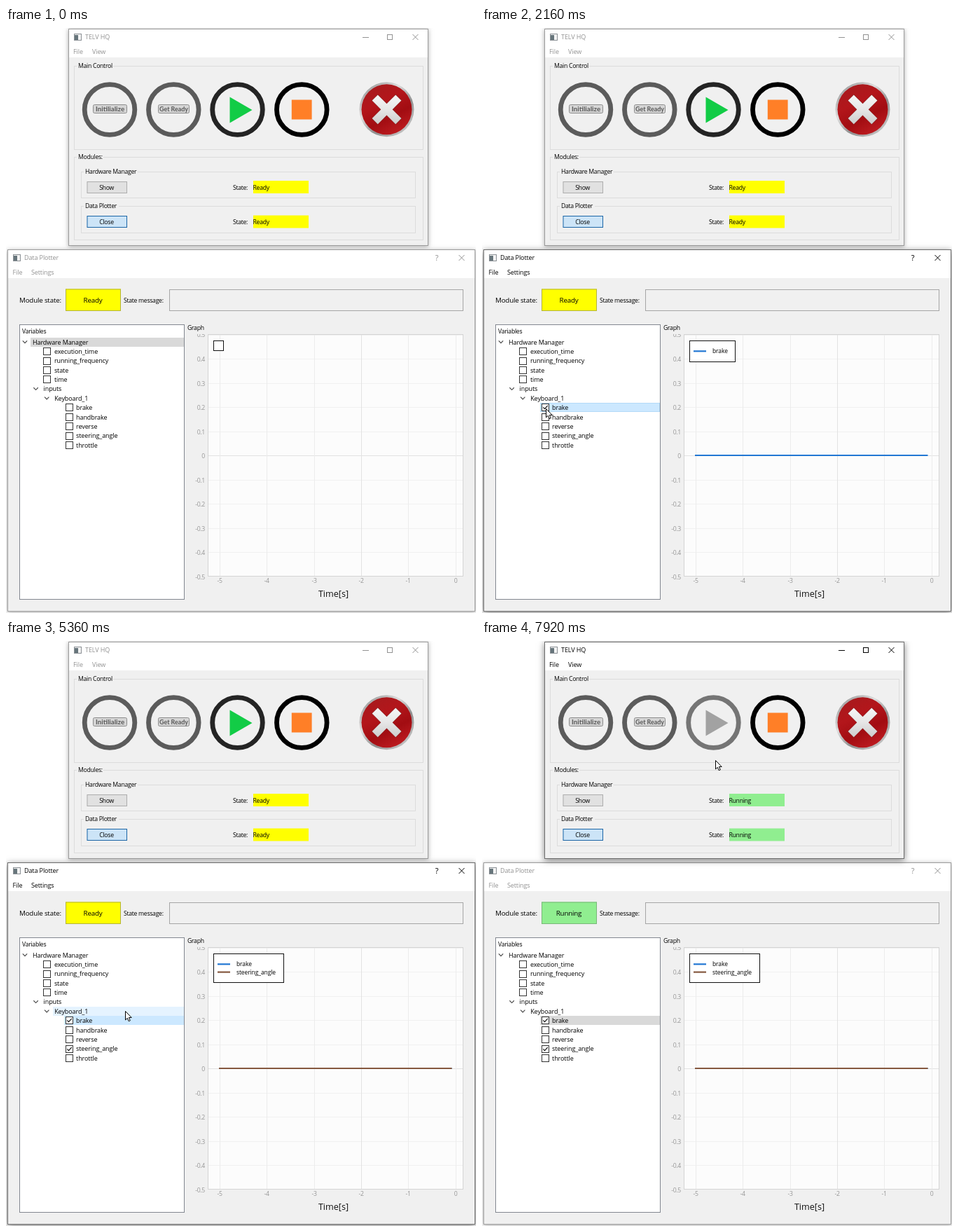
Recreate the animation shown at these times as an HTML page with a canvas. Size 671x835 px, loop 8000 ms.

```html
<!DOCTYPE html>
<html lang="en">
<head>
<meta charset="utf-8">
<title>Data Plotter</title>
<style>
  html, body { margin: 0; width: 100%; height: 100%; overflow: hidden; background: #fff; }
  canvas { display: block; }
</style>
</head>
<body>
<canvas id="stage" width="671" height="835"></canvas>
<script>
const ctx = document.getElementById('stage').getContext('2d');
const LOOP = 8000;
const UI = { size: 9, gap: -0.1 };
const SMALL = { size: 8.7, gap: -0.3 };
const BIG = { size: 9.8, gap: -0.2 };
const BLUE = '#2277d3', BROWN = '#85583f';

// Tree rows: label, depth, kind
const rows = [
  ['Hardware Manager', 0, 'node'],
  ['execution_time', 1], ['running_frequency', 1], ['state', 1], ['time', 1],
  ['inputs', 1, 'node'], ['Keyboard_1', 2, 'node'],
  ['brake', 3], ['handbrake', 3], ['reverse', 3], ['steering_angle', 3], ['throttle', 3]
];
const ROW_TOP = 441.7, ROW_H = 13.37, BRAKE = 7, STEERING = 10;

// Pointer moves: start, end, steps, points along the way
const moves = [
  [470, 1150, 10, [[615, 820], [560, 755], [455, 665], [345, 585], [245, 530],
                   [185, 502], [140, 506], [103, 526], [77, 556], [76, 558]]],
  [1310, 1770, 7, [[78, 556], [84, 548], [91, 543]]],
  [3250, 3420, 3, [[91, 552], [91, 567], [92, 579]]],
  [3560, 3960, 6, [[92, 589], [91, 585], [91, 582]]],
  [5120, 5910, 11, [[98, 579], [116, 565], [140, 548], [170, 528], [203, 497], [235, 440],
                    [259, 390], [283, 330], [303, 270], [320, 215], [335, 172]]],
  [5990, 6380, 6, [[336, 153], [333, 130], [331, 115]]],
  [6760, 6760, 1, [[330, 116]]],
  [7920, 7920, 1, [[333, 170]]]
];

function pointerAt(t) {
  const move = moves.filter(m => t >= m[0]).pop();
  if (!move) return null;
  const [start, end, steps, pts] = move;
  if (steps === 1) return pts[0];
  const step = Math.min(steps - 1, Math.floor((t - start) / (end - start) * (steps - 1) + 0.01));
  const u = step / (steps - 1) * (pts.length - 1);
  const i = Math.min(pts.length - 2, Math.floor(u + 1e-6)), f = u - i;
  return [0, 1].map(k => Math.round(pts[i][k] + (pts[i + 1][k] - pts[i][k]) * f));
}

// x, y: anchor and the middle of the capitals
function text(s, x, y, font = UI, color = '#000', align = 'left') {
  ctx.font = `${font.weight || 500} ${font.size}px ${font.family || '"Open Sans"'}, sans-serif`;
  ctx.letterSpacing = (font.gap || 0) + 'px';
  ctx.textAlign = align;
  ctx.fillStyle = color;
  ctx.fillText(s, x, y + font.size * 0.357);
}

function fill(x, y, w, h, color) {
  ctx.fillStyle = color;
  ctx.fillRect(x, y, w, h);
}

function box(x, y, w, h, color, border) {
  if (color) fill(x, y, w, h, color);
  ctx.strokeStyle = border;
  ctx.lineWidth = 1;
  ctx.strokeRect(x + 0.5, y + 0.5, w - 1, h - 1);
}

function line(pts, color, width = 1) {
  ctx.beginPath();
  pts.forEach(p => ctx.lineTo(...p));
  ctx.strokeStyle = color;
  ctx.lineWidth = width;
  ctx.stroke();
}

function shape(pts, color) {
  ctx.beginPath();
  pts.forEach(p => ctx.lineTo(...p));
  ctx.closePath();
  ctx.fillStyle = color;
  ctx.fill();
}

function disc(x, y, r, color) {
  ctx.beginPath();
  ctx.arc(x, y, r, 0, 7);
  ctx.fillStyle = color;
  ctx.fill();
}

function ring(x, color) {
  ctx.beginPath();
  ctx.arc(x, 116.5, 35.8, 0, 7);
  ctx.strokeStyle = color;
  ctx.lineWidth = 6.8;
  ctx.stroke();
}

function gradient(x0, y0, x1, y1, ...colors) {
  const g = ctx.createLinearGradient(x0, y0, x1, y1);
  colors.forEach((c, i) => g.addColorStop(i / (colors.length - 1), c));
  return g;
}

function cross(x, y, color) {
  line([[x - 4, y - 4], [x + 4, y + 4]], color);
  line([[x - 4, y + 4], [x + 4, y - 4]], color);
}

function frame(x, y, w, h, active, title, menus, textX) {
  ctx.save();
  ctx.shadowColor = active ? 'rgba(0,0,0,.5)' : 'rgba(0,0,0,.34)';
  ctx.shadowBlur = active ? 9 : 6;
  ctx.shadowOffsetY = active ? 2 : 1;
  fill(x, y, w, h, '#f0f0f0');
  ctx.restore();
  box(x, y, w, h, '#f0f0f0', active ? '#6c6c6c' : '#9c9c9c');
  fill(x + 1, y + 1, w - 2, 40, '#fff');
  const ink = active ? '#000' : '#929292';
  box(x + 8, y + 7, 11, 10, '#f4f4f4', '#8a8f94');
  fill(x + 9, y + 9, 5, 7, '#66757b');
  text(title, textX, y + 12, UI, ink);
  menus.forEach(([s, mx]) => text(s, mx, y + 33, UI, ink));
  return ink;
}

function group(title, x, y, w, h, width) {
  box(x, y, w, h, null, '#dcdcdc');
  fill(x + 4, y - 1, width + 4, 3, '#f0f0f0');
  text(title, x + 6, y, SMALL);
}

function button(label, y, color, border) {
  box(115.5, y, 57.5, 17, color, border);
  text(label, 143.5, y + 8.5, SMALL, '#000', 'center');
}

function plate(label, x, y, w, size) {
  ctx.beginPath();
  ctx.roundRect(x + 0.5, y + 0.5, w, 12, 2);
  ctx.fillStyle = '#d6d6d6';
  ctx.fill();
  ctx.strokeStyle = '#8c8c8c';
  ctx.lineWidth = 1;
  ctx.stroke();
  text(label, x + w / 2 + 0.5, y + 6.4, { size, weight: 700, family: 'Lato' }, '#585858', 'center');
}

function exitButton() {
  const x = 543.5, y = 116.3, r = 16.8;
  disc(x, y, 39, gradient(515, 85, 570, 148, '#a0a0a0', '#dedede', '#8f8f8f', '#c4c4c4'));
  disc(x, y, 36, gradient(525, 82, 560, 150, '#a81a1d', '#b3161b', '#a20d12', '#bd1b20'));
  for (const [grow, color] of [[1, '#8a2224'], [0, gradient(0, 96, 0, 137, '#f6f6f6', '#e6e6e6', '#cdcdcd')]]) {
    const a = r + grow / 2;
    line([[x - a, y - a], [x + a, y + a]], color, 11.5 + grow);
    line([[x - a, y + a], [x + a, y - a]], color, 11.5 + grow);
  }
}

function mainWindow(t, running, active) {
  const ink = frame(89, 1, 514, 310, active, 'TELV HQ', [['File', 96], ['View', 123]], 113);
  line([[509, 13.5], [518, 13.5]], ink);
  box(544, 9, 8, 8, null, ink);
  cross(584.5, 13, ink);

  group('Main Control', 97, 54, 499, 120, 48);
  const hover = t >= 5990 && !running, pressed = t >= 7220;
  if (hover) box(287, 73, 87, 86, pressed ? '#c8e0f4' : '#d8e6f1', pressed ? '#98c9ef' : '#c3dcef');
  ring(148, '#5b5b5b');
  plate('Initilialize', 124, 109, 48, 9.7);
  ring(239.3, '#5b5b5b');
  plate('Get Ready', 217, 109, 44, 8.9);
  ring(330.5, running ? '#757575' : '#242424');
  shape([[319.5, 98.5], [351.5, 117], [319.5, 135.5]], running ? '#a2a2a2' : '#12cc46');
  ring(422.3, '#000');
  fill(407.8, 102.5, 28.8, 28, '#ff7f27');
  exitButton();

  group('Modules:', 97, 184, 499, 119, 34);
  group('Hardware Manager', 107, 205, 478, 38, 73);
  group('Data Plotter', 107, 254, 478, 39, 46);
  button('Show', 219, '#e1e1e1', '#adadad');
  button('Close', 268, '#cce4f7', '#1c66a6');
  for (const y of [218, 267.5]) {
    fill(353, y, 79, 18, running ? '#90ee90' : '#ff0');
    text('State:', 324, y + 9.5, SMALL);
    text(running ? 'Running' : 'Ready', 352.5, y + 9.5, SMALL);
  }
}

function tree(t, pointer, active) {
  box(19, 423, 236, 393, '#fff', '#828790');
  text('Variables', 23, 433, SMALL);
  const selected = t < 2000 ? 0 : BRAKE;
  const inside = pointer && pointer[0] > 19 && pointer[0] < 254;
  const hovered = inside ? Math.floor((pointer[1] - ROW_TOP) / ROW_H) : -1;
  rows.forEach(([label, depth, kind], i) => {
    const top = Math.round(ROW_TOP + i * ROW_H), mid = ROW_TOP + 6.7 + i * ROW_H;
    const left = 35 + depth * 16, x = 38 + depth * 15.6;
    if (i === selected) {
      fill(left, top, 254 - left, 13, active ? '#cce8ff' : '#d9d9d9');
      if (active && i === hovered) box(left, top, 254 - left, 13, null, '#b3daf8');
    } else if (i === hovered) fill(left, top, 254 - left, 13, '#e5f3ff');

    if (kind) {
      const ax = x - 11;
      line([[ax - 3.2, mid - 2], [ax, mid + 1.3], [ax + 3.2, mid - 2]], '#444', 1.1);
      text(label, x, mid, UI);
      return;
    }
    const bx = Math.round(37.5 + depth * 15.8), by = Math.round(mid - 5.5);
    const held = i === BRAKE && t >= 2000 && t < 2160 || i === STEERING && t >= 4110 && t < 4360;
    const checked = i === BRAKE && t >= 2160 || i === STEERING && t >= 4360;
    box(bx, by, 11, 11, held ? '#cce4f7' : '#fff', held ? '#0b5c9e' : '#333');
    if (checked) line([[bx + 2.3, by + 5.3], [bx + 4.5, by + 7.7], [bx + 8.8, by + 2.8]], '#111', 1.2);
    text(label, x + 15.3, mid, UI);
  });
}

function graph(t) {
  const curves = t < 2160 ? [] : t < 4360 ? [['brake', BLUE]] : [['brake', BLUE], ['steering_angle', BROWN]];
  text('Graph', 259, 428, SMALL);
  fill(288, 437, 365, 346, '#fcfcfc');
  ctx.save();
  ctx.beginPath();
  ctx.rect(258, 437, 400, 398);
  ctx.clip();
  for (let i = 0; i <= 10; i++) {
    const y = 437.5 + i * 34.55, value = (5 - i) / 10;
    line([[288, Math.round(y) + 0.5], [652, Math.round(y) + 0.5]], i === 5 ? '#e2e2e2' : '#f1f1f1');
    text(value === 0 ? '0' : String(value), 284, y + 0.8, SMALL, '#969696', 'right');
  }
  for (let i = 0; i <= 5; i++) {
    const x = Math.round(305 + i * 67.3);
    line([[x + 0.5, 437], [x + 0.5, 783]], i === 3 ? '#e2e2e2' : '#ececec');
    text(String(i - 5), x, 789, SMALL, '#969696', 'center');
  }
  ctx.restore();
  box(288, 437, 365, 346, null, '#d4d4d4');
  text('Time[s]', 467.5, 808, { size: 12.6 }, '#111', 'center');

  curves.forEach(([, color]) => line([[304, 610], [636.5, 610]], color, 2));
  const [w, h] = [[15, 15], [66, 31], [101, 42]][curves.length];
  box(296, 446, w, h, '#fff', '#111');
  curves.forEach(([label, color], i) => {
    const y = 461.3 + i * 11.3;
    line([[302, y], [320, y]], color, 2.2);
    text(label, 329, y, { size: 8.5, gap: -0.1 });
  });
}

function plotWindow(t, pointer, running, active) {
  const ink = frame(2, 316, 668, 517, active, 'Data Plotter', [['File', 9.5], ['Settings', 36]], 26);
  text('?', 615, 328, { size: 11 }, ink, 'center');
  cross(650.5, 328, ink);

  text('Module state:', 19, 388.3, BIG);
  box(85, 372.5, 79, 31.5, running ? '#90ee90' : '#ff0', running ? '#78b878' : '#b4b43c');
  text(running ? 'Running' : 'Ready', 124, 388.3, BIG, '#000', 'center');
  text('State message:', 168, 389, SMALL);
  box(233, 373, 420, 31, null, '#a6a6a6');
  tree(t, pointer, active);
  graph(t);
}

function drawPointer([x, y]) {
  ctx.save();
  ctx.translate(x + 0.5, y + 0.5);
  const arrow = [[0, 0], [0, 12.4], [2.8, 9.8], [4.7, 14.2], [6.8, 13.3], [4.9, 9], [8.7, 9], [0, 0]];
  shape(arrow, '#fff');
  line(arrow, '#000', 1);
  ctx.restore();
}

function draw(now) {
  const t = now % LOOP;
  const pointer = pointerAt(t), running = t >= 7460;
  fill(0, 0, 671, 835, '#fff');
  const mainActive = t >= 7220, plotActive = t >= 2000 && !mainActive;
  const windows = [
    () => mainWindow(t, running, mainActive),
    () => plotWindow(t, pointer, running, plotActive)
  ];
  if (mainActive) windows.reverse();
  windows.forEach(paint => paint());
  if (pointer) drawPointer(pointer);
  requestAnimationFrame(() => draw(performance.now()));
}

draw(0);
</script>
</body>
</html>
```
